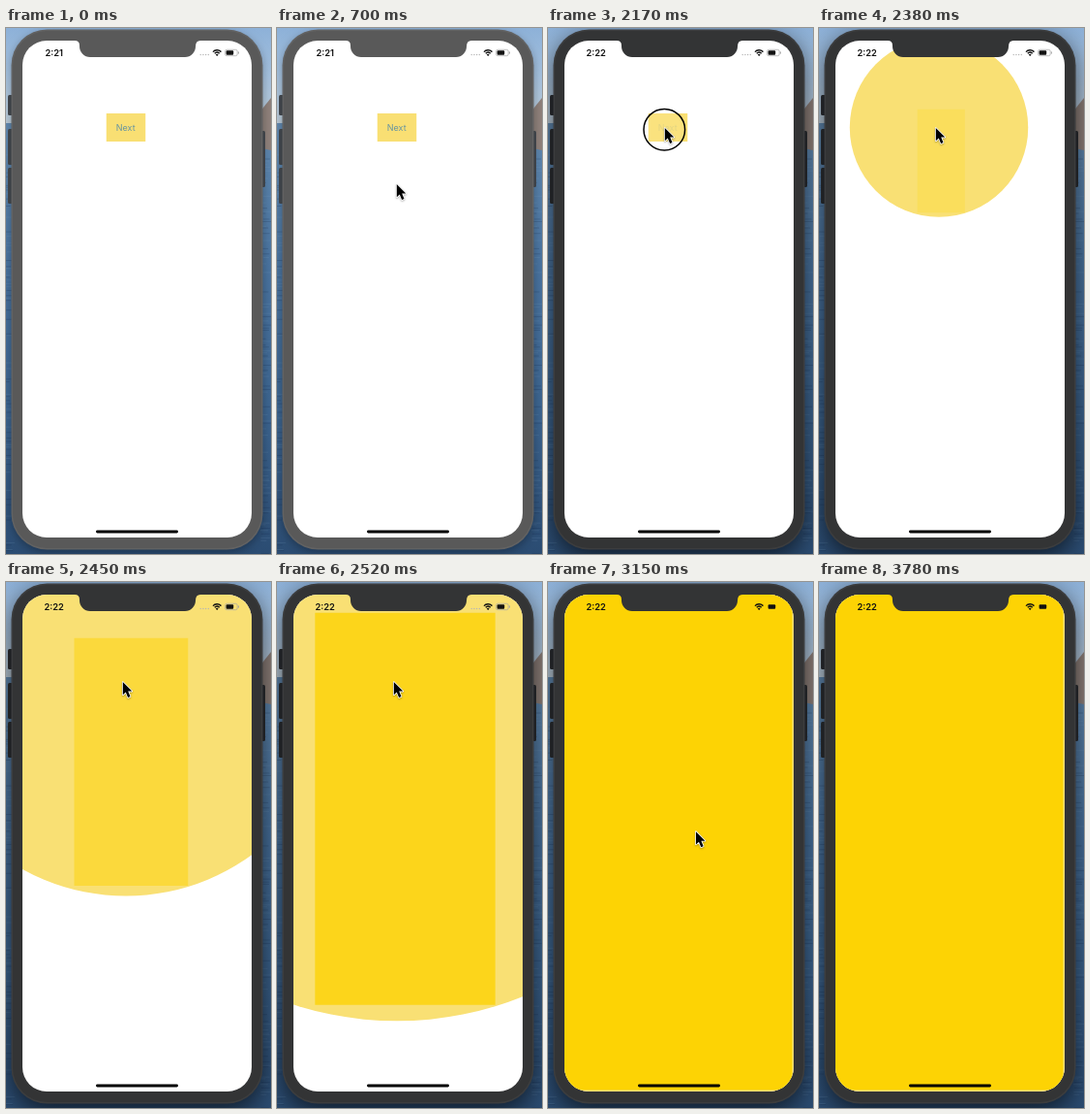
These frames come from a looping animation (274 by 542 pixels, 3.99 s). An HTML page with a canvas:

```html
<!DOCTYPE html>
<html lang="en">
<head>
<meta charset="utf-8">
<title>Bubble transition</title>
<style>
html, body { margin: 0; width: 100%; height: 100%; overflow: hidden; }
canvas { display: block; width: 274px; height: 542px; }
</style>
</head>
<body>
<canvas id="stage" width="274" height="542"></canvas>
<script>
const ctx = document.getElementById('stage').getContext('2d');
const W = 274, H = 542, LOOP = 3990, STEP = 70;
const SCREEN = { x: 17, y: 13, w: 237, h: 512, r: 25 };
const BUTTON = { x: 124, y: 102.5, w: 40.5, h: 29 };
const PALE = '#f9e074', GOLD = '#fdd304';
const MINUTE = 910, FOCUS = 1890, PRESS = 2100, RELEASE = 2275;
const GROW = { start: 2280, length: 340 };

// time, x, y of the pointer tip
const ENTER = [[420, 152, 560], [560, 142, 420], [700, 123.5, 160.5],
  [910, 122, 125], [1120, 120.5, 102.5]];
const LEAVE = [[2870, 120.5, 102.5], [3080, 140, 190], [3290, 178, 390], [3430, 205, 560]];

const ease = p => p * p * (3 - 2 * p);
const clamp = v => Math.max(0, Math.min(1, v));
const mix = (a, b, p) => a + (b - a) * p;

function fill(color, draw) {
  ctx.beginPath();
  draw();
  ctx.fillStyle = color;
  ctx.fill();
}

function box(color, x, y, w, h, r = 0) {
  fill(color, () => ctx.roundRect(x, y, w, h, r));
}

function polygon(points) {
  points.forEach(([x, y], i) => i ? ctx.lineTo(x, y) : ctx.moveTo(x, y));
  ctx.closePath();
}

function gradient(y0, y1, ...colors) {
  const g = ctx.createLinearGradient(0, y0, 0, y1);
  colors.forEach((c, i) => g.addColorStop(i / (colors.length - 1), c));
  return g;
}

function text(str, x, y, font, color) {
  ctx.font = font + ' Inter, Roboto, sans-serif';
  ctx.textAlign = 'center';
  ctx.fillStyle = color;
  ctx.fillText(str, x, y);
}

function drawBackdrop() {
  box(gradient(0, 98, '#8db1d8', '#a5c1de', '#b9cad7'), 0, 0, W, 98);
  box(gradient(98, H, '#6189b0', '#49739f', '#3c648f', '#2b4c72'), 0, 98, W, H - 98);
  fill('#8f817b', () => polygon([[255, 98], [266, 82], [W, 72], [W, 126], [255, 122]]));
  let seed = 7;
  const rand = () => (seed = seed * 16807 % 2147483647) / 2147483647;
  for (let y = 130; y < H; y += 3) {
    const x = rand() < 0.5 ? -2 : 263;
    const shade = rand() < 0.6 ? 'rgba(15,38,70,.2)' : 'rgba(140,175,210,.13)';
    box(shade, x + rand() * 3, y + rand() * 2, 5 + rand() * 5, 1);
  }
}

function drawBody(active) {
  const side = active ? '#2b2e32' : '#454a50';
  for (const [x, y, h] of [[2, 69, 21], [2, 104, 37], [2, 144, 37], [263, 106, 58]])
    box(side, x, y, 5, h, 1.5);
  ctx.save();
  ctx.shadowColor = active ? 'rgba(0,0,0,.65)' : 'rgba(0,0,0,.3)';
  ctx.shadowBlur = active ? 26 : 10;
  ctx.shadowOffsetY = active ? 8 : 3;
  box(active ? '#3c3d3e' : '#626262', 5.5, 1.5, 260, 536, 37);
  ctx.restore();
  box(active ? '#333435' : '#595959', 7, 3, 257, 533, 35.5);
}

function clipScreen() {
  const { x, y, w, h, r } = SCREEN;
  ctx.beginPath();
  ctx.roundRect(x, y, w, h, r);
  ctx.clip();
}

function drawNotch(color) {
  fill(color, () => {
    ctx.moveTo(71, 12);
    ctx.lineTo(71, 13);
    ctx.quadraticCurveTo(76, 13, 76, 18);
    ctx.arcTo(76, 30, 88, 30, 11);
    ctx.lineTo(184, 30);
    ctx.arcTo(196, 30, 196, 18, 11);
    ctx.quadraticCurveTo(196, 13, 201, 13);
    ctx.lineTo(201, 12);
  });
}

function drawButton(pressed) {
  const { x, y, w, h } = BUTTON;
  box('#f9df73', x - w / 2, y - h / 2, w, h);
  text('Next', x - 0.3, y + 3.4, '9px', pressed ? 'rgba(95,140,150,.15)' : '#6795a0');
}

function drawBubble(s) {
  const { x, y } = BUTTON;
  const dx = SCREEN.x + SCREEN.w - x, dy = SCREEN.y + SCREEN.h - y;
  fill(PALE, () => ctx.arc(x, y, Math.hypot(dx, dy) * s, 0, 7));
  const w = (SCREEN.w - 1.5) * s, h = (SCREEN.h - 1.5) * s;
  const cx = mix(x, SCREEN.x + (SCREEN.w - 1.5) / 2, s);
  const cy = mix(y, SCREEN.y + (SCREEN.h - 1.5) / 2, s);
  ctx.globalAlpha = s;
  box(GOLD, cx - w / 2, cy - h / 2, w, h);
  ctx.globalAlpha = 1;
}

function drawStatus(t, covered) {
  text(t < MINUTE ? '2:21' : '2:22', 49.7, 29, '600 9.3px', '#111');
  if (!covered) {
    for (let i = 0; i < 4; i++) box('#b5b5b5', 200.5 + i * 2.7, 26.8, 1.4, 1.4, 0.7);
    ctx.strokeStyle = '#a5a5a5';
    ctx.lineWidth = 0.7;
    ctx.beginPath();
    ctx.roundRect(226.6, 22.3, 12.6, 6.4, 1.8);
    ctx.stroke();
    box('#a5a5a5', 240, 24.3, 0.9, 2.4, 0.4);
  }
  box('#111', 227.6, 23.2, 7.6, 4.6, 1);
  ctx.strokeStyle = '#111';
  ctx.lineWidth = 1.4;
  for (const r of [3.4, 5.8]) {
    ctx.beginPath();
    ctx.arc(218.2, 28.6, r, -Math.PI * 0.76, -Math.PI * 0.24);
    ctx.stroke();
  }
  fill('#111', () => {
    ctx.moveTo(218.2, 28.9);
    ctx.arc(218.2, 28.9, 2, -Math.PI * 0.76, -Math.PI * 0.24);
  });
  box('#000', 93, 517.6, 85, 2.9, 1.45);
}

function drawTouch() {
  ctx.beginPath();
  ctx.arc(120.3, 104.7, 21.3, 0, 7);
  ctx.fillStyle = 'rgba(255,255,255,.08)';
  ctx.fill();
  ctx.strokeStyle = '#000';
  ctx.lineWidth = 1.5;
  ctx.stroke();
}

function pointerAt(t) {
  const path = t < LEAVE[0][0] ? ENTER : LEAVE;
  if (t < path[0][0]) return null;
  const i = path.findIndex(p => p[0] > t);
  if (i < 0) return path === ENTER ? path[path.length - 1].slice(1) : null;
  const a = path[i - 1], b = path[i], p = (t - a[0]) / (b[0] - a[0]);
  return [mix(a[1], b[1], p), mix(a[2], b[2], p)];
}

function drawPointer([x, y]) {
  ctx.save();
  ctx.translate(x, y);
  ctx.shadowColor = 'rgba(0,0,0,.3)';
  ctx.shadowBlur = 2;
  ctx.shadowOffsetY = 1;
  ctx.beginPath();
  polygon([[0.3, 0.5], [0.3, 13.8], [3.3, 11], [5.6, 16.5], [8, 15.5], [5.7, 10.1], [9.8, 10.1]]);
  ctx.lineJoin = 'round';
  ctx.lineWidth = 1.6;
  ctx.strokeStyle = '#fff';
  ctx.stroke();
  ctx.shadowColor = 'transparent';
  ctx.fillStyle = '#000';
  ctx.fill();
  ctx.restore();
}

function render(t) {
  const active = t >= FOCUS;
  const pressed = t >= PRESS && t < RELEASE;
  const s = ease(clamp((t - GROW.start) / GROW.length));
  drawBackdrop();
  drawBody(active);
  ctx.save();
  clipScreen();
  box('#fff', 0, 0, W, H);
  drawButton(pressed);
  if (s > 0) drawBubble(s);
  drawNotch(active ? '#333435' : '#595959');
  drawStatus(t, s > 0.9);
  ctx.restore();
  if (pressed) drawTouch();
  const pointer = pointerAt(t);
  if (pointer) drawPointer(pointer);
}

const origin = performance.now();
function tick() {
  const t = (performance.now() - origin) % LOOP;
  render(Math.floor(t / STEP) * STEP);
  requestAnimationFrame(tick);
}
tick();
</script>
</body>
</html>
```
